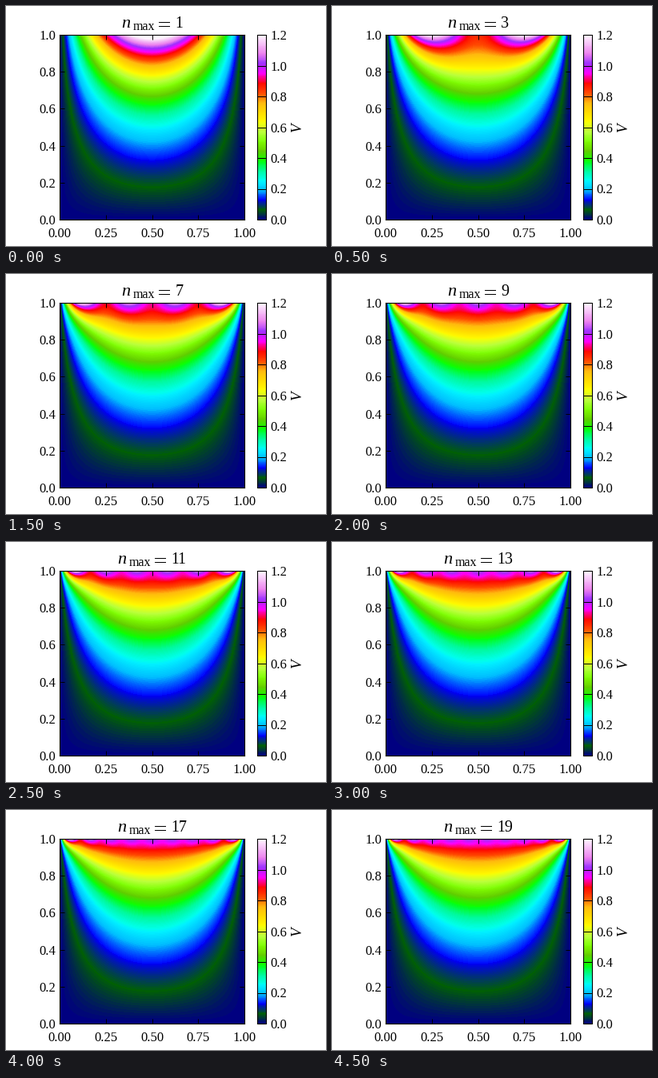
Recreate the animation shown at these times as a matplotlib script. Size 400x300 px, loop 5000 ms.

```python
import numpy as np
import matplotlib.pyplot as plt
from matplotlib.animation import FuncAnimation
from matplotlib.lines import Line2D

W, H, DPI = 400, 300, 100
FRAMES, INTERVAL = 10, 500
SIDE = 231           # plot side in pixels
V_MAX = 1.2
TITLE_MID, TITLE_BASE = 182.7, 27

plt.rcParams.update({
    "font.family": "Liberation Serif",
    "font.size": 12,
    "axes.linewidth": 0.8,
    "savefig.dpi": DPI,
})

fig = plt.figure(figsize=(W / DPI, H / DPI), dpi=DPI, facecolor="white")


def add_axes(x, y, w, h):
    """Axes placed in pixels, y measured from the bottom."""
    return fig.add_axes([x / W, y / H, w / W, h / H])


def add_text(x, y, s, size, **kw):
    """Text placed in pixels, y measured from the top."""
    return fig.text(x / W, 1 - y / H, s, fontsize=size, **kw)


def potential(n_max):
    """Partial Fourier sum for a square box with its top side held at V = 1."""
    s = np.linspace(0, 1, SIDE)
    x, y = np.meshgrid(s, s)
    v = np.zeros_like(x)
    for n in range(1, n_max + 1, 2):
        k = n * np.pi
        v += 4 / k * np.sin(k * x) * np.sinh(k * y) / np.sinh(k)
    return v


fields = [potential(2 * i + 1) for i in range(FRAMES)]

ax = add_axes(67, 33, SIDE, SIDE)
im = ax.imshow(fields[0], origin="lower", extent=(0, 1, 0, 1), aspect="auto",
               cmap="gist_ncar", vmin=0, vmax=V_MAX, interpolation="nearest")
xticks = np.linspace(0, 1, 5)
yticks = np.linspace(0, 1, 6)
ax.set_xticks(xticks, [f"{t:.2f}" for t in xticks])
ax.set_yticks(yticks, [f"{t:.1f}" for t in yticks])
ax.tick_params(direction="in", length=4, width=0.72, pad=3.5, top=True, right=True)
ax.tick_params(axis="x", pad=15.8)
for label in ax.get_xticklabels():
    label.set_va("baseline")

cax = add_axes(314, 33, 11, SIDE)
bar = fig.colorbar(im, cax=cax)
levels = np.linspace(0, V_MAX, 7)
bar.set_ticks(levels, labels=[f"{t:.1f}" for t in levels])
cax.tick_params(direction="in", length=4, width=0.72, pad=4, left=True, right=True)
add_text(365, 152, "V", 13.5, style="italic", rotation=90, ha="center", va="center")

# Title parts: n, subscript, equals sign, number
symbol = add_text(0, TITLE_BASE, "n", 16, style="italic", va="baseline")
subscript = add_text(0, TITLE_BASE + 3, "max", 11.5, va="baseline")
number = add_text(0, TITLE_BASE, "", 14.4, va="baseline")
strokes = [
    fig.add_artist(Line2D([0, 0], [1 - y / H] * 2, color="black", lw=0.72))
    for y in (TITLE_BASE - 7.5, TITLE_BASE - 2.5)
]


def draw(i):
    text = str(2 * i + 1)
    left = TITLE_MID - (67 + 10 * len(text)) / 2
    im.set_data(fields[i])
    number.set_text(text)
    for part, dx in ((symbol, 0), (subscript, 14), (number, 67)):
        part.set_x((left + dx) / W)
    for stroke in strokes:
        stroke.set_xdata([(left + 46.5) / W, (left + 60) / W])
    return [im, symbol, subscript, number, *strokes]


anim = FuncAnimation(fig, draw, frames=FRAMES, interval=INTERVAL,
                     repeat=True, repeat_delay=0, blit=False)
plt.show()
```
